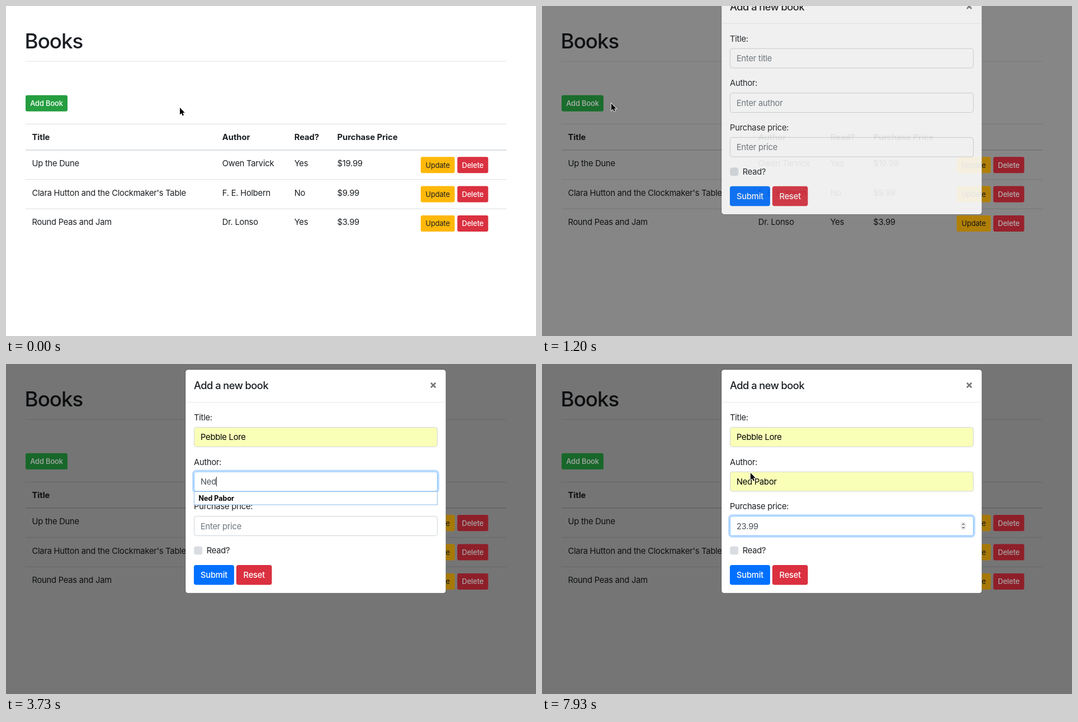
Recreate the animation shown at these times as an HTML page. Size 948 by 591 pixels, loop 8 s.

```html
<!DOCTYPE html>
<html lang="en">
<head>
<meta charset="utf-8">
<title>Books</title>
<style>
html, body { margin: 0; width: 100%; height: 100%; overflow: hidden; background: #fff; }
svg { display: block; width: 100%; height: 100%; }
text { font: 440 14.75px Inter, sans-serif; letter-spacing: -.25px; fill: #1b1f23; font-optical-sizing: none; white-space: pre; }
.h1 { font-size: 36.8px; font-weight: 500; letter-spacing: -1.1px; }
.h5 { font-size: 18.4px; font-weight: 500; letter-spacing: -.6px; }
.th { font-weight: 700; letter-spacing: -.04px; }
.sm { font-size: 12.9px; letter-spacing: -.12px; }
.hint { font-size: 12.5px; font-weight: 700; letter-spacing: 0; fill: #000; }
.mid { text-anchor: middle; }
.light { fill: #fff; font-weight: 500; }
</style>
</head>
<body>
<svg id="stage" viewBox="0 0 948 591" preserveAspectRatio="none"></svg>
<script>
const LOOP = 8000, STEP = 1000 / 15, OPEN = 1072;
const GREEN = '#259e40', RED = '#da303f', YELLOW = '#ffb80a', BLUE = '#0070ff';

const books = [
  ['Up the Dune', 'Owen Tarvick', 'Yes', '$19.99'],
  ["Clara Hutton and the Clockmaker's Table", 'F. E. Holbern', 'No', '$9.99'],
  ['Round Peas and Jam', 'Dr. Lonso', 'Yes', '$3.99']
];
const columns = [46.5, 386.8, 515.7, 592.5];

const fields = [
  { y: 113, label: 'Title:', hint: 'Enter title', full: 'Pebble Lore', focus: 1840, blur: 2860,
    keys: [[2270, 'P'], [2670, 'Pebble Lore']] },
  { y: 192.6, label: 'Author:', hint: 'Enter author', full: 'Ned Pabor', focus: 2860, blur: 4830,
    keys: [[3330, 'N'], [3530, 'Ne'], [3730, 'Ned'], [4530, 'Ned Pabor']] },
  { y: 272.2, label: 'Purchase price:', hint: 'Enter price', focus: 4830, blur: 9000,
    keys: [[5470, '2'], [5800, '23'], [6300, '23.'], [7130, '23.9'], [7270, '23.99']] }
];

const smooth = u => u * u * (3 - 2 * u);
const easeIn = u => u * u;
const easeOut = u => 1 - Math.pow(1 - u, 1.7);

// time, x, y, easing towards the point
const pointer = [
  [0, 311, 182], [60, 311, 182, smooth], [870, 88, 175, smooth], [1080, 88, 175, smooth],
  [1200, 120, 175, easeIn], [1720, 421, 131, easeOut], [7670, 421, 131, smooth], [7930, 373, 195, smooth]
];

const clamp = u => Math.max(0, Math.min(1, u));
const text = (x, y, s, cls = '', extra = '') => `<text x="${x}" y="${y}" class="${cls}" ${extra}>${s}</text>`;
const box = (x, y, w, h, r, fill, extra = '') =>
  `<rect x="${x}" y="${y}" width="${w}" height="${h}" rx="${r}" fill="${fill}" ${extra}/>`;
const rule = (x, y, w, h, fill) => box(x, y, w, h, 0, fill);

function smallButton(x, y, w, label, fill, cls = 'light') {
  return box(x, y, w, 29, 3, fill) + text(x + w / 2, y + 19.3, label, 'sm mid ' + cls) +
    box(x, y, w, 29, 3, '#000', 'class="shade" opacity="0"');
}
function bigButton(x, w, label, fill) {
  return box(x, 360, w, 35.6, 4, fill) + text(x + w / 2, 383.3, label, 'mid light');
}

function page() {
  let s = text(33.6, 76, 'Books', 'h1') + rule(35, 98.7, 860, 1, '#e3e3e3');
  for (const [y, h] of [[211, 1], [257, 2], [310.2, 1], [362.7, 1]]) s += rule(35, y, 860, h, '#dadfe3');
  ['Title', 'Author', 'Read?', 'Purchase Price'].forEach((h, i) => s += text(columns[i], 240.3, h, 'th'));
  books.forEach((b, r) => b.forEach((c, i) => s += text(columns[i], 287.2 + r * 52.4, c)));
  return s;
}
function buttons() {
  let s = smallButton(35, 159.8, 75, 'Add Book', GREEN) +
    box(33.5, 158.3, 78, 32, 4.5, 'none', `id="addRing" stroke="${GREEN}" stroke-width="3"`);
  books.forEach((b, r) => {
    const y = 270.2 + r * 52.4;
    s += smallButton(741.8, y, 60.8, 'Update', YELLOW, '') + smallButton(807.3, y, 55.2, 'Delete', RED);
  });
  return s;
}
function field(f, i) {
  const y = f.y;
  return text(336, y - 12, f.label) +
    box(334.5, y - 1.5, 439, 38.6, 5.5, 'none', `id="ring${i}" stroke="#007bff" stroke-width="3"`) +
    box(336.5, y + .5, 435, 34.8, 4, '#fff', `id="input${i}" stroke="#ced4da"`) +
    text(348, y + 23.3, '', '', `id="value${i}"`) +
    `<path id="caret${i}" d="M0 ${y + 9.3}v17" stroke="#222"/>`;
}
function hintList(f, i) {
  return f.full ? `<g id="list${i}">` + box(336.5, f.y + 35.8, 435, 23.7, 0, '#fff', 'stroke="#8dbde6"') +
    text(344.5, f.y + 52.8, f.full, 'hint') + '</g>' : '';
}
function modal() {
  return box(320.5, 9.5, 466.8, 401.4, 5, '#000', 'opacity=".3"') + box(321.2, 10.2, 465.4, 400, 4.4, '#fff') +
    text(336, 45.3, 'Add a new book', 'h5') +
    '<path d="M760 33.8l8.4 8.4m0-8.4l-8.4 8.4" stroke="#777" stroke-width="2.7"/>' +
    rule(321.2, 68, 465.4, 1, '#e6e9ec') + fields.map(field).join('') +
    `<g id="spinner">${box(749.3, 283.3, 8.6, 13.4, 4, '#f3f3f3', 'stroke="#dcdcdc" stroke-width=".8"')}
      <path d="M751.6 288.2l2-2.2 2 2.2m-4 3.6l2 2.2 2-2.2" fill="none" stroke="#444" stroke-width="1.1"/></g>` +
    box(336.3, 326.5, 15, 15, 4, '#d9dde2') + text(358.7, 339.4, 'Read?') +
    bigButton(336, 72, 'Submit', BLUE) + bigButton(412, 63.5, 'Reset', RED) +
    fields.map(hintList).join('');
}

const stage = document.getElementById('stage');
stage.innerHTML = rule(0, 0, 948, 591, '#fff') + page() +
  '<rect id="backdrop" width="948" height="591"/>' + buttons() + `<g id="modal">${modal()}</g>` +
  `<g id="pointer">
    <path id="arrow" d="M0 0V12.8L2.9 10 4.9 14.4 7 13.5 5.1 9.2H8.9Z" fill="#000" stroke="#fff" stroke-width="1.6" paint-order="stroke"/>
    <path id="beam" d="M-2.5-7.5q2.5 0 2.5 2v11q0 2-2.5 2m5-15q-2.5 0-2.5 2m0 11q0 2 2.5 2" fill="none" stroke="#222"/>
  </g>`;

const $ = id => document.getElementById(id);
const shades = stage.querySelectorAll('.shade');
const set = (id, key, v) => $(id).setAttribute(key, v);
const show = (id, on) => set(id, 'visibility', on ? 'inherit' : 'hidden');
const glow = (t, on, off) => clamp((t - on) / 130) * (1 - clamp((t - off) / 130));

function drawField(f, i, t) {
  const past = f.keys.filter(k => k[0] <= t), last = past[past.length - 1];
  const value = last ? last[1] : '', filled = value !== '' && value === f.full;
  const active = t >= f.focus && t < f.blur, node = $('value' + i);
  node.textContent = value || f.hint;
  node.style.fill = filled ? '#000' : value ? '#495057' : '#6c757d';
  const light = glow(t, f.focus, f.blur);
  set('ring' + i, 'opacity', light * .27);
  set('input' + i, 'fill', filled ? '#faffb8' : '#fff');
  set('input' + i, 'stroke', light > .5 ? '#80bdff' : '#ced4da');
  const since = t - Math.max(f.focus, last ? last[0] : 0);
  show('caret' + i, active && since % 1000 < 500);
  set('caret' + i, 'transform', `translate(${348.5 + (value ? node.getComputedTextLength() : 0)})`);
  if (f.full) show('list' + i, active && value && !filled);
}

function drawPointer(t) {
  let n = pointer.findIndex(p => p[0] > t);
  if (n < 0) n = pointer.length - 1;
  const a = pointer[n - 1], b = pointer[n], u = b[3] ? b[3](clamp((t - a[0]) / (b[0] - a[0]))) : 0;
  const x = a[1] + (b[1] - a[1]) * u, y = a[2] + (b[2] - a[2]) * u;
  const typing = t > OPEN + 300 && x > 336 && y > 113 && y < 149;
  set('pointer', 'transform', `translate(${x} ${y})`);
  show('pointer', t < 2270 || t >= 7730);
  show('arrow', !typing);
  show('beam', typing);
}

function draw(t) {
  const fade = clamp((t - OPEN) / 150), slide = easeOut(clamp((t - OPEN) / 300));
  set('backdrop', 'opacity', fade * .541);
  shades.forEach(s => s.setAttribute('opacity', fade * .35));
  set('addRing', 'opacity', glow(t, 870, OPEN) * .5);
  set('modal', 'opacity', fade);
  set('modal', 'transform', `translate(0 ${-100 * (1 - slide)})`);
  show('spinner', t >= fields[2].focus);
  fields.forEach((f, i) => drawField(f, i, t));
  drawPointer(t);
}

const hold = t => Math.floor((t + 5) / STEP) * STEP + 4;

const start = performance.now();
function tick() {
  draw(hold((performance.now() - start) % LOOP));
  requestAnimationFrame(tick);
}
tick();
</script>
</body>
</html>
```
